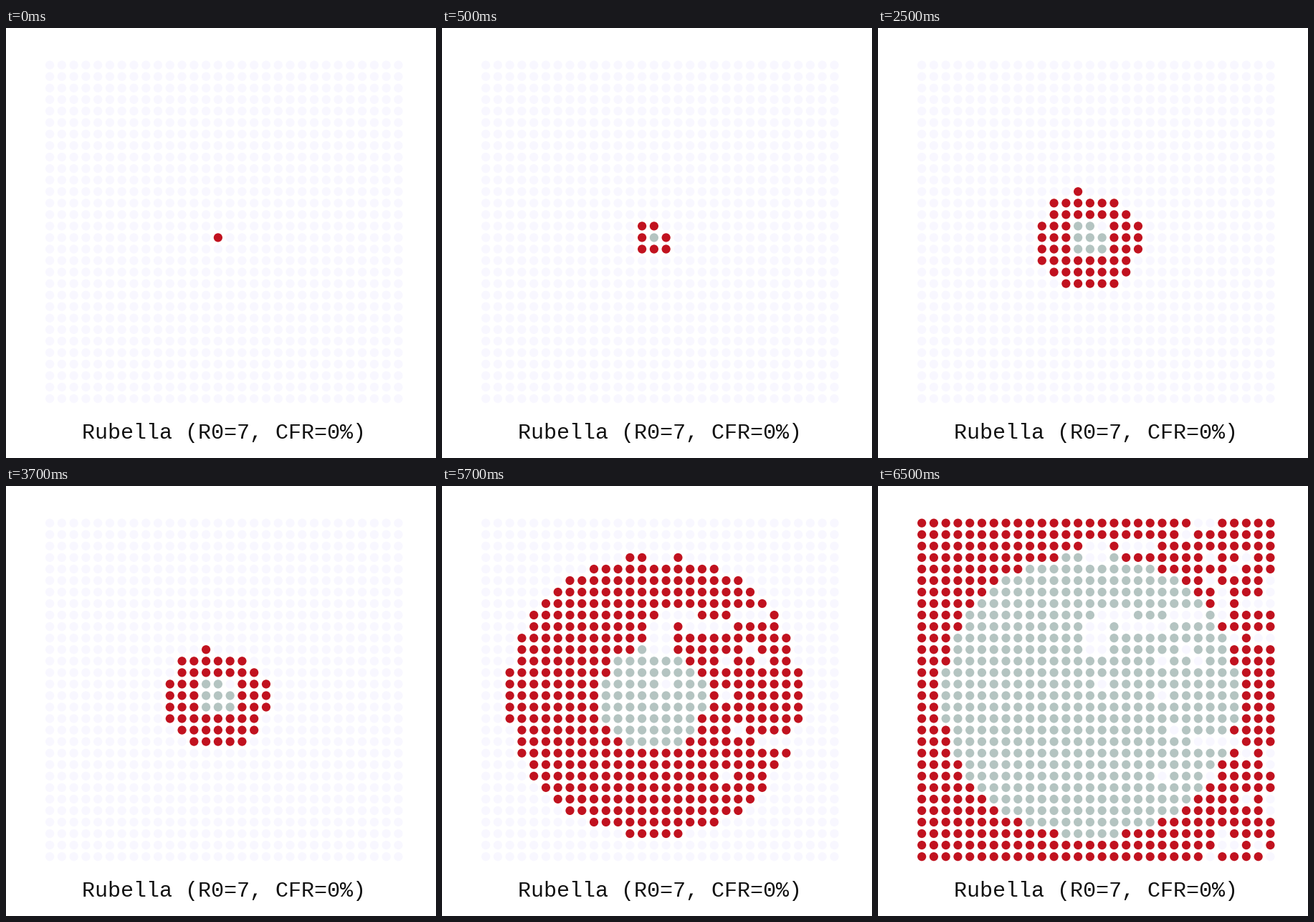
Recreate the animation shown at these times as a matplotlib script. Size 600 px wide and 600 px high, loop 8 s.

```python
import numpy as np
import matplotlib.pyplot as plt
from matplotlib.animation import FuncAnimation

SIZE, DPI = 600, 100
N = 30
DOT = 12.2
HEALTHY, SICK, IMMUNE = "#f8f7ff", "#c1121f", "#b4c4c1"

# Squared reach of the outbreak in each generation.
REACH = [0, 2.5, 19.2, 151.5, np.inf]

rows, cols = np.mgrid[:N, :N]
dx, dy = cols - 14, rows - 15
dist2 = dx ** 2 + dy ** 2

# Spread is slower towards the upper right; the bias fades with distance.
spread = dist2 + (0.2 * dx - 0.6 * dy) / (1 + (dist2 / 60) ** 2)

# People who are never infected: stray ones, more often to the right,
# and a few clusters given as (col, row, width, height).
stray_chance = 0.18 * np.clip((cols - 17) / 12, 0, 1)
missed = np.random.default_rng(7).random((N, N)) < stray_chance
for col, row, width, height in [
        (14, 2, 2, 2), (17, 2, 3, 1), (27, 7, 3, 1), (15, 8, 3, 1),
        (21, 8, 3, 1), (14, 9, 2, 3), (17, 9, 4, 1), (15, 14, 1, 1),
        (23, 19, 3, 1)]:
    missed[row:row + height, col:col + width] = True


def reached(generation):
    return (spread <= REACH[generation]) & ~missed


def colours(generation):
    grid = np.full((N, N), HEALTHY, dtype="U7")
    grid[reached(generation)] = SICK
    if generation:
        grid[reached(generation - 1)] = IMMUNE
    return grid.ravel()


fig = plt.figure(figsize=(SIZE / DPI, SIZE / DPI), dpi=DPI, facecolor="white")
ax = fig.add_axes([0, 0, 1, 1])
ax.set(xlim=(0, SIZE), ylim=(SIZE, 0))
ax.axis("off")

dots = ax.scatter(61.1 + 16.77 * cols.ravel(), 51.7 + 16.05 * rows.ravel(),
                  s=(DOT * 72 / DPI) ** 2, c=colours(0), linewidths=0)
ax.text(304, 573, "Rubella (R0=7, CFR=0%)", ha="center", va="baseline",
        family="Liberation Mono", fontsize=30 * 72 / DPI, color="#111111")


def update(frame):
    # The first state lasts one tick, each later one four ticks.
    dots.set_facecolor(colours((frame + 3) // 4))
    return (dots,)


anim = FuncAnimation(fig, update, frames=16, interval=500, repeat=True)
plt.show()
```
